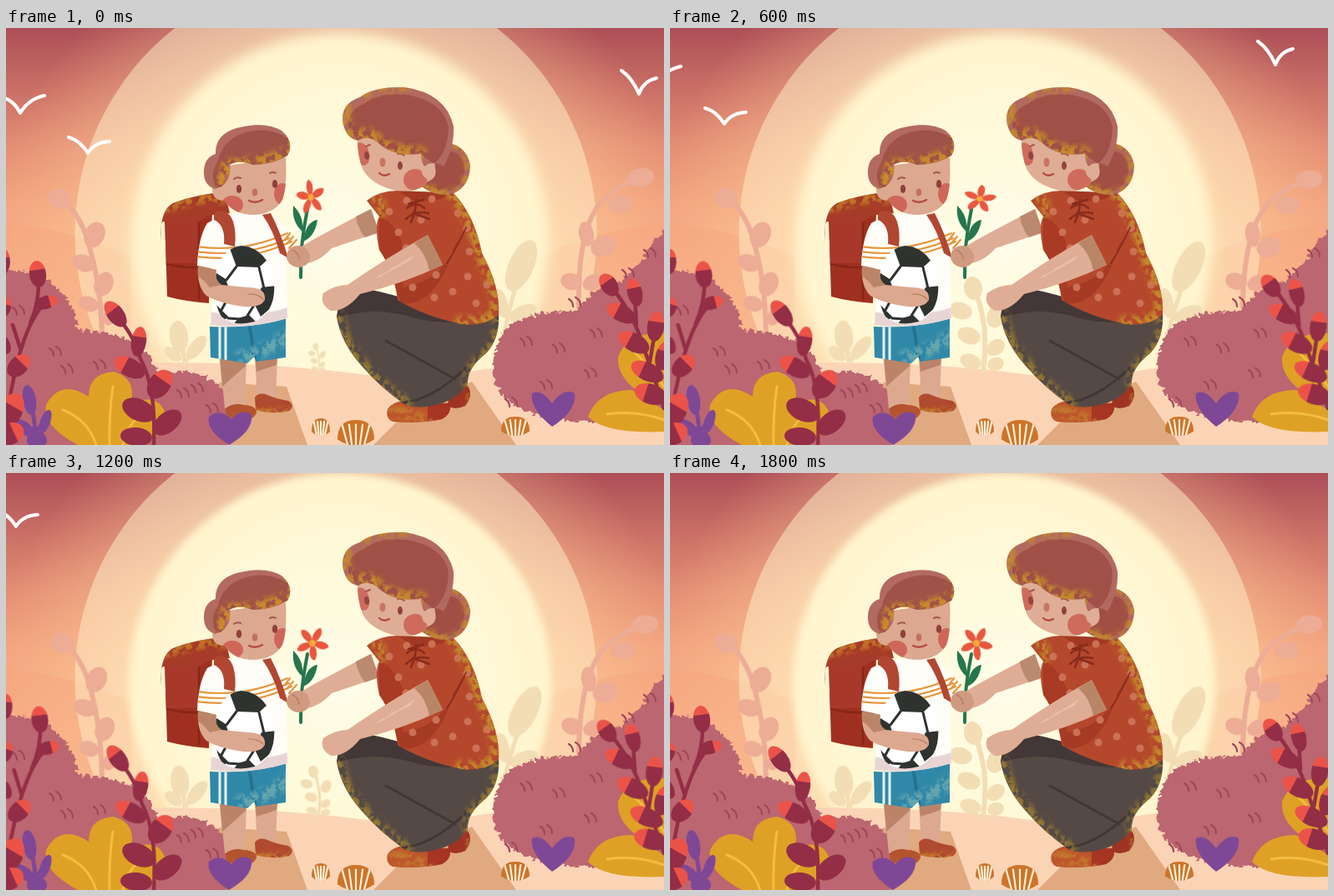
These frames come from a looping animation (788x500 px, 2000 ms). An HTML page:

```html
<!DOCTYPE html>
<html lang="en">
<head>
<meta charset="utf-8">
<title>Flower for the teacher</title>
<style>
html, body { margin: 0; width: 100%; height: 100%; overflow: hidden; background: #f3a980; }
svg { display: block; width: 788px; height: 500px; }
</style>
</head>
<body>
<svg id="stage" viewBox="0 0 788 500" width="788" height="500"></svg>
<script>
const STEP = 200;
const stage = document.getElementById('stage');

// Drawing helpers
let clips = 0;
const fill = (d, color, more = '') => `<path d="${d}" fill="${color}" ${more}/>`;
const line = (d, color, w, more = '') =>
  `<path d="${d}" fill="none" stroke="${color}" stroke-width="${w}" stroke-linecap="round" stroke-linejoin="round" ${more}/>`;
const oval = (x, y, rx, ry, color, rot = 0) =>
  `<ellipse rx="${rx}" ry="${ry}" fill="${color}" transform="translate(${x} ${y}) rotate(${rot})"/>`;
const leaves = (list, color) => list.map(([x, y, rx, ry, rot]) => oval(x, y, rx, ry, color, rot)).join('');
const group = (id, body, pivot = '0 0') =>
  `<g id="${id}" style="transform-origin:${pivot.split(' ').map(v => v + 'px').join(' ')}">${body}</g>`;

// A shape with extra paint kept inside its outline
const inside = (d, color, body) => {
  const id = 'c' + clips++;
  return `<clipPath id="${id}"><path d="${d}"/></clipPath>${fill(d, color)}<g clip-path="url(#${id})">${body}</g>`;
};
const grain = (d, color, w) => line(d, color, w, 'filter="url(#grain)"');

const defs = `<defs>
  <linearGradient id="sky" x2="0" y2="1">
    <stop stop-color="#ae4e57"/><stop offset=".06" stop-color="#b85c5d"/>
    <stop offset=".16" stop-color="#cd7267"/><stop offset=".28" stop-color="#e28d74"/>
    <stop offset=".42" stop-color="#f2a27d"/><stop offset=".8" stop-color="#fbc39b"/>
  </linearGradient>
  <radialGradient id="glow" gradientUnits="userSpaceOnUse" cx="398" cy="300" r="430">
    <stop offset=".55" stop-color="#ffd3a0" stop-opacity=".75"/><stop offset="1" stop-color="#ffc08e" stop-opacity="0"/>
  </radialGradient>
  <radialGradient id="sun">
    <stop stop-color="#fffde9"/><stop offset=".5" stop-color="#fffadb"/><stop offset="1" stop-color="#fff4cd"/>
  </radialGradient>
  <linearGradient id="bud" x2="0" y2="1">
    <stop offset=".33" stop-color="#ec5348"/><stop offset=".35" stop-color="#932e46"/>
  </linearGradient>
  <filter id="soft" x="-10%" y="-10%" width="120%" height="120%"><feGaussianBlur stdDeviation="5"/></filter>
  <filter id="halo" x="-10%" y="-10%" width="120%" height="120%"><feGaussianBlur stdDeviation="8"/></filter>
  <filter id="grain" filterUnits="userSpaceOnUse" x="0" y="0" width="788" height="500" color-interpolation-filters="sRGB">
    <feGaussianBlur stdDeviation="3" result="b"/>
    <feTurbulence type="fractalNoise" baseFrequency=".13" numOctaves="4" seed="4"/>
    <feColorMatrix values="0 0 0 0 0  0 0 0 0 0  0 0 0 0 0  7 0 0 0 -2.9" result="n"/>
    <feComposite in="b" in2="n" operator="in"/>
  </filter>
  <filter id="fuzz" filterUnits="userSpaceOnUse" x="-20" y="200" width="830" height="320">
    <feTurbulence type="fractalNoise" baseFrequency=".2" numOctaves="2" seed="7"/>
    <feDisplacementMap in="SourceGraphic" scale="11" xChannelSelector="R" yChannelSelector="G"/>
  </filter>
</defs>`;

function sky() {
  return `<rect width="788" height="500" fill="url(#sky)"/>`
    + `<rect width="788" height="500" fill="url(#glow)"/>`
    + fill('M0 235Q75 240 150 275V420H0ZM788 235Q710 240 640 275V420H788Z', '#f6a57d', 'opacity=".45"')
    + `<circle cx="395" cy="246" r="312.500" fill="#fff0c9" opacity=".5"/>`
    + group('small', `<circle cx="400" cy="256" r="250" fill="url(#sun)" filter="url(#halo)"/>`)
    + group('large', `<circle cx="400" cy="253" r="253" fill="url(#sun)" filter="url(#soft)"/>`);
}

function ground() {
  return fill('M140 402Q300 398 440 417Q530 421 620 400L788 400V500H140Z', '#fbd4b6')
    + fill('M255 425L336 430L361 500H255Z', '#e0a97f')
    + fill('M470 470L558 424L611 500H440Z', '#e0a97f');
}

function palePlants() {
  const pink = '#ecac95', cream = '#f3ddb5';
  const left = line('M115 366Q113 310 102 270Q92 225 66 204', pink, 6) + leaves([
    [64, 205, 14, 12, 20], [106, 248, 12, 16, 25], [93, 282, 14, 10, 20],
    [117, 307, 11, 15, 25], [99, 331, 12, 9, 20], [125, 345, 8, 12, 25]], pink);
  const right = line('M686 335Q684 240 714 207Q732 190 756 180', pink, 6) + leaves([
    [760, 179, 16, 11, -10], [735, 211, 15, 10, -8], [695, 247, 9, 15, -10],
    [715, 262, 15, 12, -20], [677, 304, 13, 10, 15], [702, 305, 12, 9, -30]], pink);
  const tall = line('M596 370Q604 330 616 290', cream, 5)
    + leaves([[617, 285, 15, 33, 24], [593, 330, 8, 18, -15], [619, 342, 18, 9, -25]], cream);
  const low = line('M214 402Q212 380 207 368M214 402L227 382', cream, 5)
    + leaves([[207, 370, 11, 19, -8], [228, 383, 8, 17, 38], [200, 391, 12, 7, 35]], cream);
  const sprout = line('M375 412Q380 370 374 345Q370 325 364 312', cream, 6) + leaves([
    [363, 312, 11, 14, -10], [348, 339, 14, 10, 15], [391, 345, 11, 15, 25],
    [358, 369, 14, 10, 20], [390, 383, 12, 9, -40], [360, 400, 13, 9, 20], [390, 403, 10, 8, -20]], cream);
  return group('tall', tall, '598 365') + group('low', low, '214 402') + group('sprout', sprout, '374 412')
    + group('paleL', left, '115 366') + group('paleR', right, '685 330');
}

function bushes() {
  const tick = (x, y) => `M${x} ${y}q5 3 5 9m3-11q6 3 6 10`;
  const spots = [[8, 335], [52, 384], [66, 405], [105, 400], [205, 434], [222, 428], [240, 452],
    [616, 372], [655, 380], [693, 410], [640, 424], [598, 445], [674, 325], [700, 362], [764, 266], [738, 290]];
  return `<g filter="url(#fuzz)">`
    + fill('M-10 290Q25 288 50 304Q83 324 86 362Q130 364 155 378Q175 392 182 415Q220 406 246 422Q274 438 273 468L262 510H-10Z', '#bb6670')
    + fill('M800 236Q775 250 765 274Q752 292 735 304Q698 312 683 340Q640 336 606 354Q579 378 584 416Q590 455 650 468Q710 476 800 470Z', '#bb6670')
    + '</g>' + line(spots.map(s => tick(...s)).join(''), '#a2465a', 2.2);
}

function boy() {
  const skin = '#dca890', shade = '#bb8468', gold = '#c98a2a';
  const hair = 'M250 193Q236 188 237 171Q238 155 251 151Q250 128 276 120Q310 111 330 123Q346 137 337 153Q318 164 296 164Q278 157 268 164Q270 182 258 190Z';
  const pack = 'M190 226L247 220L243 330Q215 328 193 322Z';
  const flap = 'M185 256Q184 218 200 210Q228 199 262 197L268 222Q242 222 232 232Q220 236 186 232Z';
  const shirt = 'M241 234Q262 221 290 222L318 223Q330 235 347 258L335 268L337 348Q292 362 245 356L249 289L229 285Q230 252 241 234Z';
  const shorts = 'M244 358Q295 361 335 347V395L300 400L297 394L289 402L245 395Z';
  const ball = 'M250 308Q252 265 282 261Q314 264 321 304Q324 340 298 352Q272 359 258 346Q249 332 250 308Z';
  const legs = fill('M256 396L288 398L286 456H262Z', skin) + fill('M256 396L288 398L287 405L259 430Z', shade)
    + fill('M298 394H325L323 445H301Z', skin) + fill('M298 394H325L324 404L300 412Z', shade)
    + inside('M263 456Q272 449 285 452Q300 453 300 461Q297 471 280 470Q262 469 263 456Z', '#b4542f', grain('M262 470H302', gold, 8))
    + inside('M298 443Q303 436 313 440Q324 445 338 447Q347 453 339 459Q320 464 299 458Z', '#b04a30', grain('M298 461H345', gold, 8));
  const bag = inside(pack, '#9f301f', fill('M190 222H232V282H190Z', '#a8382a') + line('M192 283Q215 288 230 287M231 232V325', '#872518', 2.5))
    + inside(flap, '#a73b29', grain('M186 216Q222 201 260 203', '#bf7426', 15));
  const top = inside(shirt, '#fffdf8', line('M228 262Q285 270 337 246M228 268Q285 276 339 252M228 274Q285 282 342 256', '#e4953c', 2.2)
    + fill('M244 340Q290 350 338 335V362H244Z', '#dfc9ca', 'opacity=".75"'));
  const cuff = line('M334 254L340 246M336 259L344 250M339 264L348 254', '#e4953c', 2.2);
  const straps = fill('M249 222Q265 214 272 232Q276 245 274 262L261 259Q263 236 249 230Z', '#b14731')
    + fill('M307 224L317 222Q329 245 338 276L328 270Q320 242 307 224Z', '#b14731');
  const football = inside(ball, '#ffffff',
    fill('M266 259L290 259L315 276L303 287L276 286Z M246 290L263 301L269 318L248 320Z M306 311L324 309V330L305 346L297 330Z M252 332L267 347L254 353Z M278 348L291 344L303 356H272Z', '#2f3330')
    + line('M276 286L264 302M303 287L309 312M269 318L258 338M298 331L289 345M266 348L280 349', '#2f3330', 3));
  const arm = fill('M230 285L252 290Q249 302 258 308L289 311Q312 311 310 326Q305 336 284 334Q255 330 240 321Q228 309 230 285Z', skin)
    + fill('M230 285L252 290Q249 302 258 308L244 311Q236 301 230 298Z', shade) + line('M291 319Q303 319 308 325', shade, 1.6);
  const face = inside('M247 193Q256 185 265 165L335 155Q337 190 331 206Q321 223 297 224Q272 224 262 207Q247 207 247 193Z', skin,
    oval(271, 212, 13, 11, '#cf665a') + oval(331, 199, 10, 13, '#cf665a'));
  const features = oval(279, 193, 3.2, 5, '#8f403b') + oval(322, 187, 3.2, 5, '#8f403b')
    + line('M273 181Q277 178 281 180M316 174Q320 172 323 174', '#a4584b', 2)
    + oval(298, 197, 3.3, 4.5, '#c2705f') + line('M291 207Q299 211 307 206', '#b54b43', 2.3);
  const cap = inside(hair, '#b36a60',
    fill('M252 192Q243 176 254 159Q258 139 277 129Q315 112 350 140L336 158Q310 170 290 163L266 163L260 192Z', '#9f5348')
    + grain('M256 194Q261 179 266 165Q295 167 336 152', gold, 17) + grain('M340 126V158', gold, 9));
  return legs + bag + inside(shorts, '#3088a8', line('M256 357V400M263 358V400', '#e9f5f5', 3)
    + line('M292 360L299 402', '#24718f', 4) + grain('M282 394Q310 390 335 370', '#66a6af', 16))
    + top + cuff + straps + football + arm + face + features + cap;
}

function woman() {
  const skin = '#dfad95', shade = '#b98567', gold = '#c3882c', dark = '#882b1d';
  const torso = 'M432 207Q447 195 469 195L536 198Q561 224 570 270Q592 310 590 344Q573 358 546 355Q501 346 469 326Q464 290 447 266Q441 237 447 226Z';
  const pants = 'M396 346Q398 318 433 313Q500 327 544 353Q575 357 590 341Q592 372 575 390Q552 408 553 426Q541 447 510 453Q490 457 477 451Q447 430 425 404Q401 377 396 346Z';
  const bun = 'M515 137Q551 135 556 165Q555 193 531 200Q511 201 498 190L508 160Z';
  const hair = 'M404 116Q399 91 424 83Q440 70 477 71Q527 78 536 118Q537 144 524 166Q517 160 505 163Q499 172 497 151Q465 155 447 139Q435 127 421 135Q408 132 404 116Z';
  const farArm = fill('M437 217L447 245L390 264Q373 283 352 283Q340 278 347 266Q367 254 382 246Z', skin)
    + fill('M437 217L447 245L430 251Q420 238 419 226Z', '#bb896f');
  const nearArm = fill('M505 248L523 284Q475 307 424 319Q407 340 389 339Q375 331 380 318Q394 308 409 308Q458 274 505 248Z', skin)
    + fill('M505 248L523 284L507 291Q503 270 489 258Z', shade)
    + line('M445 299Q470 286 488 273M460 290L485 277', '#ecc3aa', 1.5);
  const dots = [[480, 207], [510, 205], [459, 220], [541, 222], [470, 245], [552, 240], [497, 230], [465, 285],
    [487, 311], [515, 296], [553, 298], [513, 323], [535, 316], [563, 330], [555, 268], [479, 264], [576, 308]];
  const blouse = inside(torso, '#b5482c',
    fill('M469 195H536Q522 211 486 206Z', '#a13824') + fill('M447 220L470 245Q485 280 471 326Q462 288 447 266Z', '#a93a24')
    + fill('M551 238Q532 270 518 292Q495 310 472 311V330Q502 335 524 296Z', '#a53a25')
    + dots.map(([x, y]) => oval(x, y, 4.5, 4.5, '#cb7157')).join('')
    + grain('M536 196Q561 224 570 270Q592 310 590 344Q573 358 546 355', gold, 20) + grain('M440 204Q455 205 448 225', gold, 10));
  const sleeve = fill('M500 250Q514 245 528 251Q541 267 530 279L523 285Q516 264 500 250Z', '#b5482c')
    + line('M528 282Q543 258 551 239', dark, 1.7);
  const knots = line('M491 206Q492 217 485 233M480 216Q491 207 501 216M479 229Q490 218 506 222M487 222L507 229M482 211L500 206', dark, 2.5);
  const shoes = inside('M457 457Q466 444 490 448L531 450Q535 462 522 469Q492 475 463 472Q454 468 457 457Z', '#bd552c',
      fill('M505 450H540V475H505Z', '#a73524') + grain('M456 461Q475 456 505 474', '#c2772f', 15))
    + inside('M530 443Q541 425 553 429Q560 440 550 453Q537 459 529 453Z', '#9f3323', grain('M554 429V455', '#b7692b', 7));
  const trousers = inside(pants, '#554945',
    fill('M396 346Q398 318 433 313Q500 327 544 353Q505 354 480 345Q445 337 420 342Z', '#433837')
    + line('M455 375Q500 400 538 421M470 450Q509 448 551 407', '#413736', 3)
    + grain('M396 346Q401 377 425 404Q447 430 477 451', '#927633', 18) + grain('M590 341Q592 372 575 390Q552 408 553 426', '#927633', 13));
  const face = inside('M421 128L510 132L514 168Q517 180 505 184Q495 198 467 195Q437 188 427 169Q420 150 421 128Z', skin,
    oval(490, 182, 14, 13, '#cf6b5d') + oval(426, 151, 9, 14, '#cf6b5d', -15));
  const features = oval(506, 172, 8, 9, skin) + oval(432, 153, 3, 5, '#91443e', -10) + oval(472, 165, 3, 5, '#91443e')
    + line('M431 142L436 140M469 151Q473 150 477 153', '#a4584b', 2)
    + oval(451, 161, 3.5, 5.5, '#c97561') + line('M447 174Q452 179 459 175', '#b54b43', 2.3);
  const back = inside(bun, '#b0645a', fill('M517 147Q548 145 549 168Q549 190 528 196L496 191L506 160Z', '#a14f45')
    + grain('M537 138Q557 149 556 167Q553 195 531 200L500 192', gold, 11));
  const front = inside(hair, '#b16960',
    fill('M410 119Q409 98 429 91Q445 77 480 80Q524 88 530 119Q529 150 512 163L497 151Q465 152 447 139Q435 127 421 135Z', '#a05046')
    + grain('M405 96Q400 119 421 134Q434 120 447 139Q470 151 496 150', gold, 17) + grain('M425 83Q448 69 482 73', gold, 8));
  return { farArm, body: shoes + trousers + blouse + sleeve + knots + nearArm + back + face + features + front };
}

function flower() {
  const petals = [0, 1, 2, 3, 4].map(i =>
    `<path d="M0 1C-6 -7 -6 -16 -1 -21C6 -18 6 -8 0 1Z" fill="#e9573f" transform="rotate(${i * 72})"/>`).join('');
  const green = '#26764d';
  return line('M353 299Q352 260 361 217', green, 4)
    + fill('M356 256Q359 232 373 230Q370 250 356 256ZM355 244Q342 233 344 213Q357 225 355 244Z', green)
    + group('bloom', petals + oval(0, 0, 4, 4, '#f2ad38'));
}

function redPlant(id, pivot, stem, buds) {
  return group(id, line(stem, '#932e46', 4.5) + leaves(buds, 'url(#bud)'), pivot);
}

function foreground() {
  const yellow = '#dfa125', vein = '#f4bc45', purple = '#7f4897';
  const shell = (x, y, w, h) => inside(`M${x - w} ${y + h * .45}Q${x - w} ${y - h} ${x} ${y - h}Q${x + w} ${y - h} ${x + w} ${y + h * .45}Q${x} ${y + h * 1.4} ${x - w} ${y + h * .45}Z`,
    '#cd7429', line([-.65, -.32, 0, .32, .65].map(k => `M${x + k * w * .65} ${y + h}L${x + k * w * 1.15} ${y - h * .65}`).join(''), '#fff0d8', 2.2));
  const sprig = line('M34 500Q37 475 29 448M35 485L47 470', purple, 5)
    + leaves([[28, 446, 8, 18, -10], [47, 472, 6, 15, 20], [23, 480, 7, 15, -50], [37, 494, 12, 10, 0]], purple);
  const yellowLeft = fill('M86 500Q43 477 48 452Q65 420 99 442Q99 414 129 412Q158 421 149 451Q184 435 192 466Q190 486 166 500Z', yellow)
    + line('M128 430Q123 465 124 500M68 458Q98 469 108 500M168 460Q145 473 140 500', vein, 3);
  const yellowRight = fill('M788 366Q744 364 733 394Q731 421 764 440H788ZM697 466Q709 434 750 434L788 458V484Q717 487 697 466Z', yellow)
    + line('M752 388Q772 407 788 430M720 463Q755 458 788 470', vein, 3);
  return shell(377, 479, 11, 11) + shell(419, 486, 22, 16) + shell(610, 478, 17, 12)
    + yellowLeft + yellowRight + sprig
    + redPlant('redL', '0 472', 'M0 472Q12 390 30 354Q38 338 48 328M29 354Q40 330 39 300M17 384L8 356', [
      [38, 295, 10, 16, -8], [48, 329, 8, 14, 75], [15, 405, 11, 16, 45], [-3, 280, 8, 15, 0],
      [-2, 335, 8, 12, 15], [-4, 378, 8, 14, -30], [4, 460, 15, 24, 30], [4, 487, 13, 18, 65]])
    + redPlant('redM', '177 500', 'M177 500Q180 430 161 397Q153 367 131 344', [
      [131, 343, 10, 18, -38], [159, 376, 9, 18, 8], [148, 407, 11, 20, -62], [184, 427, 13, 19, 35]])
    + `<g>${leaves([[159, 458, 21, 13, 25], [193, 473, 20, 12, -38], [156, 490, 19, 11, 5]], '#932e46')}</g>`
    + redPlant('redR', '788 456', 'M788 456Q772 405 763 382Q753 345 724 309M755 356L753 322M771 400L778 360', [
      [722, 308, 10, 15, -35], [753, 317, 9, 17, -12], [737, 342, 10, 19, -63],
      [778, 358, 10, 18, 8], [752, 377, 11, 20, -62], [788, 393, 10, 18, 15], [768, 412, 11, 21, -65], [772, 439, 12, 20, -72]])
    + fill('M267 500Q239 482 243 466Q256 455 270 469Q280 456 294 463Q297 483 267 500Z', purple)
    + fill('M654 478Q627 456 630 438Q641 432 654 450Q668 431 681 438Q684 459 654 478Z', purple);
}

const teacher = woman();
const birds = line('M-5 83Q10 87 17 102Q27 85 46 81M75 131Q89 135 98 150Q106 137 124 136M737 51Q750 60 758 79Q763 64 779 60', '#ffffff', 4);
const hands = oval(350, 274, 14, 13, '#cf9a80', 10) + line('M343 266Q350 269 351 277', '#b77f67', 1.6);
stage.innerHTML = defs + sky() + group('birds', birds) + ground() + palePlants() + bushes()
  + boy() + flower() + teacher.farArm + hands + teacher.body + foreground();

// Motion: every pose holds for one step
const loop = (id, poses) => {
  const n = poses.length;
  document.getElementById(id).animate(
    [...poses, poses[n - 1]].map((pose, i) => ({ ...pose, offset: i / n, easing: 'steps(1, end)' })),
    { duration: STEP * n, iterations: Infinity });
};
const sway = (id, deg, beat) => loop(id, [...beat].map(b => ({ transform: `rotate(${b * deg}deg)` })));
const pulse = '0110011001';

loop('small', [...pulse].map(b => ({ opacity: 1 - b })));
loop('large', [...pulse].map(b => ({ opacity: +b })));
loop('birds', [[0, 0], [-5, -9], [-15, -18], [-33, -35], [-50, -53], [-67, -70], [-86, -86], [-104, -101], [-122, -117], [-140, -135]]
  .map(([x, y]) => ({ transform: `translate(${x}px, ${y}px)` })));
loop('sprout', [.3, .54, .76, 1, 1].map(s => ({ transform: `scale(${s})` })));
loop('bloom', [[365, 203, .84, 1.03, -8], [367, 204, .95, 1, 32], [369, 204, 1, .88, 0], [371, 205, .96, .82, 10], [367, 204, .95, 1, 32]]
  .map(([x, y, sx, sy, r]) => ({ transform: `translate(${x}px, ${y}px) scale(${sx}, ${sy}) rotate(${r}deg)` })));

sway('paleL', 1.1, '01011');
sway('paleR', 2, '01011');
sway('tall', 3, '01011');
sway('low', 2, '01011');
sway('redL', .8, '01010');
sway('redM', 1, '01010');
sway('redR', -1, '01010');
</script>
</body>
</html>
```
